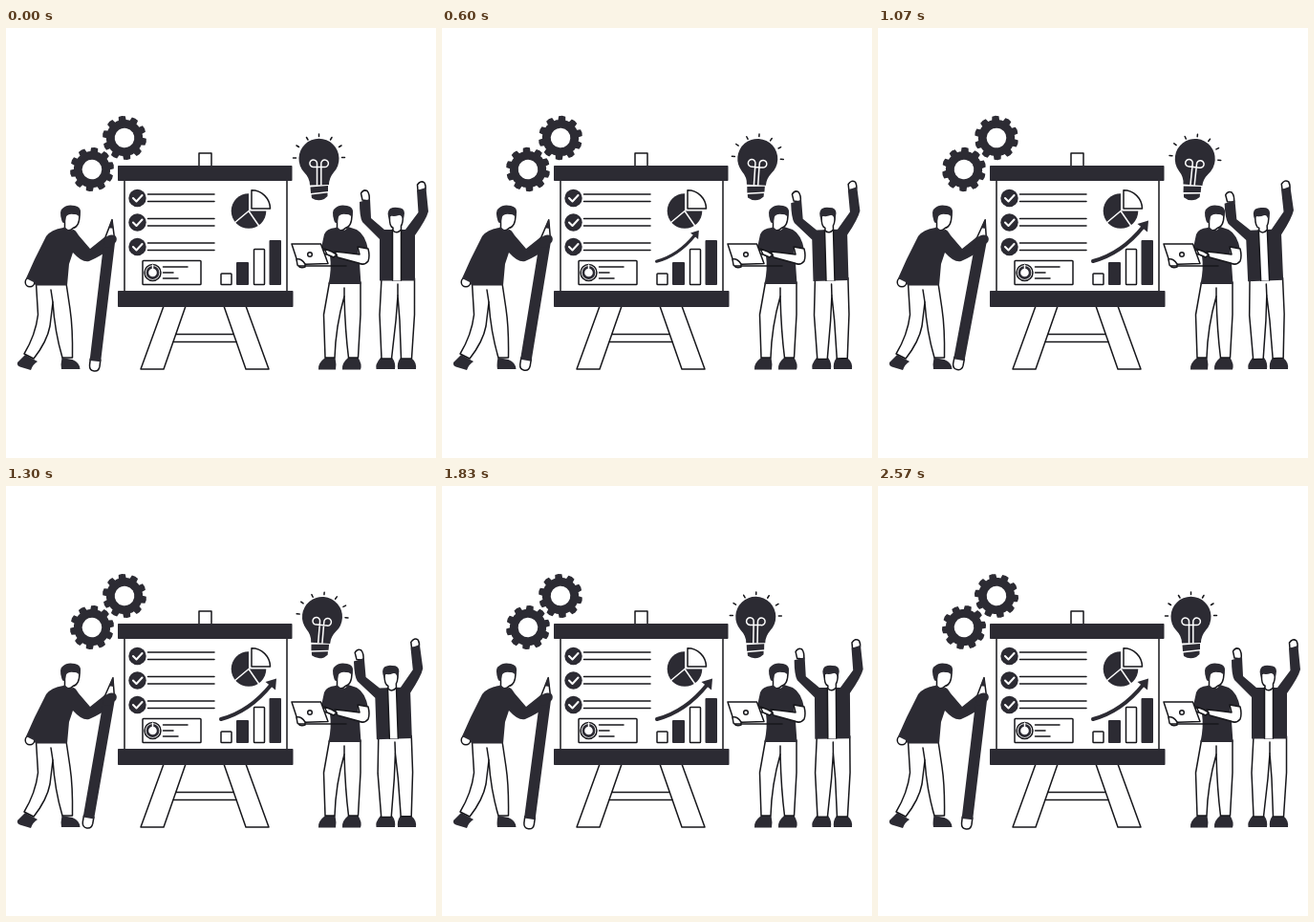
Animation, 450 px wide and 450 px high, one loop 2.6 s. Source, as an HTML page:

```html
<!DOCTYPE html>
<html lang="en">
<head>
<meta charset="utf-8">
<title>Team presentation</title>
<style>
  html, body { margin: 0; width: 100%; height: 100%; overflow: hidden; background: #fff; }
  svg { display: block; width: 100%; height: 100%; }
  .d { fill: #2c2b33; }
  .w { fill: #fff; stroke: #17171b; stroke-width: 1.5; stroke-linejoin: round; stroke-linecap: round; }
  .l { fill: none; stroke: #17171b; stroke-width: 1.5; stroke-linecap: round; stroke-linejoin: round; }
  .v { fill: none; stroke: #fff; stroke-width: 1.5; stroke-linecap: round; stroke-linejoin: round; }
</style>
</head>
<body>
<svg viewBox="0 0 450 450">
  <defs>
    <g id="head">
      <path class="w" d="M61.500 196V210Q66 214 70 209.500Q77 208 77 195L66 192Z"/>
      <path class="d" d="M58.500 202Q55 191 59.500 188.500Q64 184 72 186Q79 187.500 78 194L76.800 198.500Q75.500 194.500 71 195Q65 194 63 197.500L61.500 204Q59 204.500 58.500 202Z"/>
    </g>
  </defs>

  <g id="gearA"></g>
  <g id="gearB"></g>

  <g id="easel">
    <rect class="w" x="202" y="131" width="13" height="15"/>
    <path class="w" d="M165 291H188L165 357H141ZM228 291H251L275 357H251Z"/>
    <path class="l" d="M178 320.500H238M175.500 328.500H241"/>
    <rect class="w" x="124" y="158" width="170" height="119"/>
    <rect class="d" x="117" y="144" width="182.500" height="16" rx=".8"/>
    <rect class="d" x="117" y="275" width="183.500" height="17" rx=".8"/>
  </g>

  <g id="list"></g>

  <g id="card">
    <rect class="w" x="143" y="243.500" width="61" height="25" rx=".8"/>
    <circle class="w" cx="153.500" cy="256" r="8.500"/>
    <circle cx="153.500" cy="256" r="5.600" fill="none" stroke="#2c2b33" stroke-width="2.600"/>
    <path class="v" d="M153.500 252V248" stroke-width="1"/>
    <path class="l" d="M164.500 250H190M164.500 256H175M164.500 262H180"/>
  </g>

  <g id="pie">
    <circle class="d" cx="254" cy="191.500" r="18.300"/>
    <path d="M254 191.500V172H274V191.500Z" fill="#fff"/>
    <path class="v" d="M254 191.500L239 204M254 191.500L265 207.500"/>
    <path class="w" d="M257 189V169.800A19.500 19.500 0 0 1 276.500 189Z"/>
  </g>

  <g id="bars">
    <rect class="w" x="225" y="257" width="11" height="11.500" rx=".8"/>
    <rect class="w" x="259.500" y="231.500" width="11" height="37" rx=".8"/>
    <rect class="d" x="241" y="245" width="13" height="24" rx="1"/>
    <rect class="d" x="275.500" y="222" width="12.500" height="47" rx="1"/>
  </g>
  <g id="arrow">
    <path d="M225 244Q255 236 277.500 208" fill="none" stroke="#2c2b33" stroke-width="4" stroke-linecap="round"/>
    <path class="d" d="M283 201.500L271.500 205L282 213.500Z"/>
  </g>

  <g id="writer">
    <path class="d" d="M20 342L12 350Q11 354 16 355L26 358Q28 352 33 349ZM58.500 345Q57 352 58 357H77.500Q77 350 69.500 347Z"/>
    <path class="w" d="M31.500 267L33.500 300Q31 321 19 341L29 346Q43 328 46 312L49 287Q51 318 59 345H69.500Q70 314 67 294L63 267Z"/>
    <path class="l" d="M49 287L47 274"/>
    <circle class="w" cx="25" cy="266" r="4.800"/>
    <use href="#head"/>
    <path class="d" d="M60 209Q47 211 42 218L30 242L21 262L29 266L31 269.500H64L66 247L70 235Q80 246 87 244Q99 239 112 229L103 219L88 231L76 217Q72 210 70 211Q65 213 61.500 208Z"/>
  </g>
  <g id="pencil">
    <path class="w" d="M-5.300 4L0 -17L5.300 4Z"/>
    <path class="d" d="M0 -18L-2.500 -8H2.500Z"/>
    <path class="w" d="M-5.300 130H5.300V137Q5 142.500 0 142.500T-5.300 137Z"/>
    <path class="d" d="M-5.800 4Q-3 1 0 4Q3 1 5.800 4V132H-5.800Z"/>
  </g>
  <path class="d" d="M103 220Q108 215 114 217Q117 220 115 224L108 230L103 229Z"/>

  <g id="bulb">
    <path class="d" d="M318 164.500Q318 157 312 151A21 21 0 1 1 343 151Q338 157 338 164Z"/>
    <path class="v" d="M325.500 164V142A3.800 3.800 0 1 0 322 145.500H333A3.800 3.800 0 1 0 329.800 142V164"/>
    <path class="d" d="M318.500 166.500L337 165V171L319 173ZM319.500 174.500L336.500 172.500V176L333 179Q326 182 320 178Z"/>
    <path class="l" d="M327.500 111V113.500M314.500 114.500L316 117M341 114.500L339.500 117M304 123L306.500 124.500M351 123L348.500 124.500M300.500 136H303.500M351.500 135.500H354.500"/>
  </g>

  <g id="typist">
    <path class="d" d="M334 345H344.500Q346 352 345 357.500H327Q326 351 334 345ZM358 345H368.500Q373 352 371 357.500H352Q351 351 358 345Z"/>
    <path class="w" d="M338.500 266L332.500 300L334 345H344Q345 312 354 281Q355 318 358.500 345H368.500L371 300V266Z"/>
    <path class="l" d="M354 281V272"/>
    <use href="#head" x="285"/>
    <path class="w" d="M332 227L341 232L340 238L332 236Z"/>
    <path class="d" d="M345 209Q335 210 333 216L330 230L338 234L339 238Q341 252 337.500 268H371.500L370 246L346 239L348 236L369 238L368 230L379 232Q376 216 367 211L358 208Q353 216 346.500 208Z"/>
    <path class="w" d="M344 234L354 235L370 237L368 229L379 231Q381 239 379 244Q375 249 369 246L347 240Z"/>
    <path class="w" d="M299 226H329.500L337 246.500L306 247.500Z"/>
    <circle class="l" cx="318" cy="237" r="2.300"/>
    <path class="w" d="M304 242Q309 241 313 247V250Q308 252 305 248Z"/>
    <path class="l" d="M307 249H356"/>
    <path class="w" d="M333 231L341 234L346 237L343 240L336 237Z"/>
  </g>

  <path class="d" d="M392 345H404Q408 350 407 357H387.500Q386 352 392 345ZM413 345H424Q430 350 429 357H410Q409 350 413 345Z"/>
  <g id="cheer">
    <path class="w" d="M393 262L391 300L393 346H403.500L408 306L410 280L412 306L413.500 346H424.500L427.500 300V262Z"/>
    <path class="l" d="M410 280V268"/>
    <path class="w" d="M373 180L371.500 173Q374 168.500 378 170.500Q381 174 380 181ZM431 170L430.500 164Q434 159 438 162Q440 166 438.500 170Z"/>
    <path class="d" d="M370 182L381 179L382 199L396 211H418L431.500 193L430 170L439.500 167L442 192Q440 200 428 217V264.500H391V221L373 203Q370 198 370 182Z"/>
    <path d="M404.500 211H413.500V264H404.500Z" fill="#fff"/>
    <path class="l" d="M404.500 211V264M413.500 211V264"/>
    <path class="w" d="M401.500 197Q401 208 405 209V212Q409 216 413.500 211V207Q415.500 204 415.500 196L407 193Z"/>
    <path class="d" d="M401 201Q398 192 402 189Q406 187 410 188Q417 188 417 194L415.500 202Q414 195 411 196Q405 198 402.500 196Z"/>
  </g>
</svg>
<script>
const LOOP = 2600;
const $ = id => document.getElementById(id);
const set = (id, value) => $(id).setAttribute('transform', value);

function gearMarkup(teeth, root, tip) {
  const step = 2 * Math.PI / teeth;
  const points = [];
  for (let i = 0; i < teeth; i++) {
    for (const [r, k] of [[root, -.33], [tip, -.25], [tip + .4, 0], [tip, .25], [root, .33], [root + .2, .5]]) {
      const a = (i + k) * step;
      points.push((r * Math.cos(a)).toFixed(2) + ',' + (r * Math.sin(a)).toFixed(2));
    }
  }
  return `<polygon class="d" points="${points.join(' ')}"/><circle r="10.300" fill="#fff"/>`;
}
$('gearA').innerHTML = $('gearB').innerHTML = gearMarkup(10, 19, 22.8);

$('list').innerHTML = [178, 203.5, 229].map(y => `
  <circle class="d" cx="137.500" cy="${y}" r="9.200"/>
  <path class="v" style="stroke-width:2" d="M133 ${y}l3.500 3.500l6-6.500"/>
  <path class="l" d="M148.500 ${y - 4}H218M148.500 ${y + 3.5}H218"/>`).join('');

const clamp = u => Math.min(1, Math.max(0, u));
// Soft start and end around a mostly linear middle
const ease = u => (u + (1 - Math.cos(Math.PI * u)) / 2) / 2;
const ramp = (t, from, to) => ease(clamp((t - from) / (to - from)));

function draw(t) {
  const sway = ramp(t, 0, 980) - ramp(t, 1050, 2070);
  const turn = 360 * t / LOOP;
  set('gearA', `translate(124 115) rotate(${11 + turn})`);
  set('gearB', `translate(90 148) rotate(${25 - turn})`);
  set('pencil', `translate(109 217.500) rotate(${6.8 + 3.8 * sway})`);
  set('bulb', `rotate(${6 * sway} 328 178)`);
  set('cheer', `rotate(${-2.5 * sway} 409 354)`);
  set('arrow', `translate(223 245) scale(${ramp(t, 0, 840)}) translate(-223 -245)`);
}

const start = performance.now();
function tick() {
  draw((performance.now() - start) % LOOP);
  requestAnimationFrame(tick);
}
draw(0);
requestAnimationFrame(tick);
</script>
</body>
</html>
```
